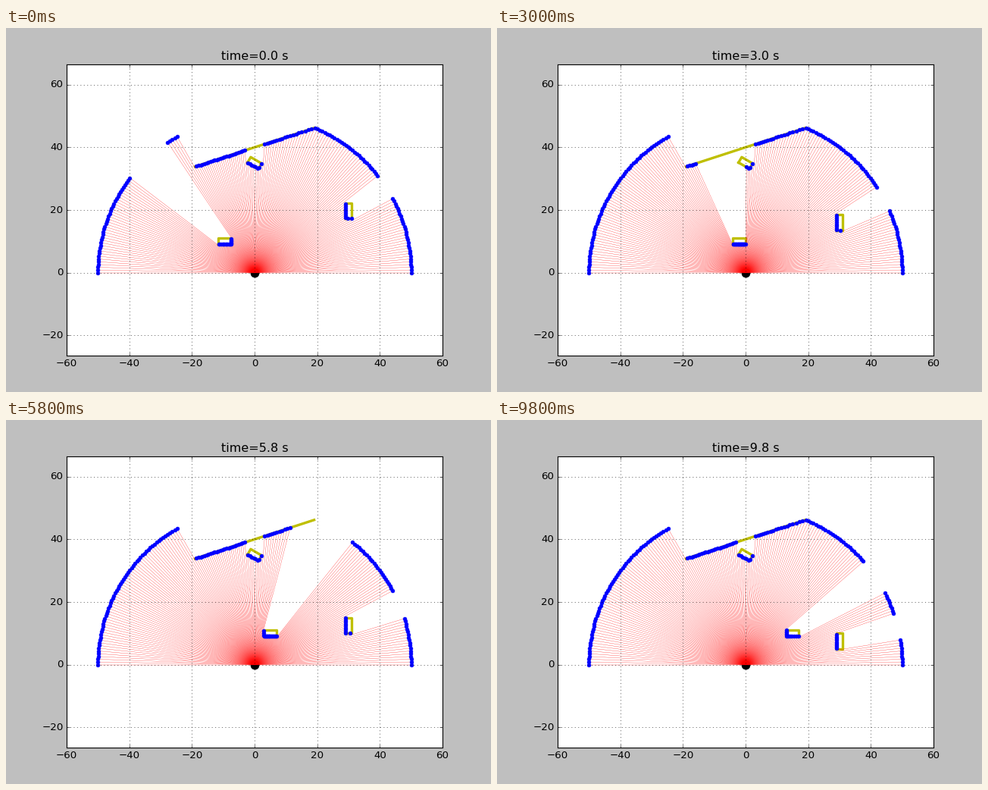
Animation, 640 px wide and 480 px high, one loop 10 s. Source, as a matplotlib script:

```python
import numpy as np
import matplotlib.pyplot as plt
from matplotlib.animation import FuncAnimation
from matplotlib.collections import LineCollection

STEP = 0.2        # seconds per frame
FRAMES = 50
REACH = 50.0      # sensor range
ANGLES = np.linspace(0, np.pi, 180)
RAYS = np.column_stack([np.cos(ANGLES), np.sin(ANGLES)])

plt.style.use("classic")
plt.rcParams.update({
    "font.family": "DejaVu Sans",
    "savefig.dpi": "figure",
    "savefig.facecolor": "auto",
})


def box(cx, cy, w, h, deg=0.0):
    """Closed outline of a rotated rectangle."""
    a = np.radians(deg)
    u = np.array([np.cos(a), np.sin(a)]) * w / 2
    v = np.array([-np.sin(a), np.cos(a)]) * h / 2
    corners = [-u - v, u - v, u + v, -u + v, -u - v]
    return np.array([cx, cy]) + np.array(corners)


def cross(a, b):
    return a[..., 0] * b[..., 1] - a[..., 1] * b[..., 0]


def scan(shapes):
    """First hit along every ray, or the end of its reach."""
    dist = np.full(len(RAYS), REACH)
    for shape in shapes:
        for p, q in zip(shape[:-1], shape[1:]):
            edge = q - p
            det = cross(RAYS, edge)
            ok = np.abs(det) > 1e-12
            safe = np.where(ok, det, 1.0)
            along = cross(p, edge) / safe
            part = cross(p, RAYS) / safe
            hit = ok & (along > 0) & (part >= 0) & (part <= 1)
            dist = np.where(hit, np.minimum(dist, along), dist)
    return RAYS * dist[:, None]


def scene(k):
    n = k + 1
    return [
        box(-10 + 0.5 * n, 10, 4, 2),
        box(30, 20 - 0.25 * n, 2, 5),
        box(0, 35, 4, 2, -30),
        box(0, 40, 40, 0, 18)[:2],
    ]


fig = plt.figure(figsize=(8, 6), dpi=80)
ax = fig.add_axes([0.125, 0.1, 0.775, 0.8])
half = 60 * 384 / 496
ax.set_xlim(-60, 60)
ax.set_ylim(20 - half, 20 + half)
ax.grid(True)

ax.plot(0, 0, "ko", ms=10, zorder=2)
outlines = [ax.plot([], [], color="y", lw=3, zorder=2.1)[0] for _ in range(4)]
beams = LineCollection([], colors="r", linewidths=0.25, zorder=2.2)
ax.add_collection(beams, autolim=False)
hits, = ax.plot([], [], "o", color="b", ms=4.4, mec="b", mew=0.5, zorder=2.3)
title = ax.set_title("")


def draw(k):
    shapes = scene(k)
    for line, shape in zip(outlines, shapes):
        line.set_data(shape[:, 0], shape[:, 1])
    ends = scan(shapes)
    beams.set_segments([[(0, 0), tuple(e)] for e in ends])
    hits.set_data(ends[:, 0], ends[:, 1])
    title.set_text(f"time={k * STEP:.1f} s")
    return [*outlines, beams, hits, title]


anim = FuncAnimation(fig, draw, frames=FRAMES, init_func=lambda: draw(0),
                     interval=1000 * STEP, repeat=True, repeat_delay=0)
plt.show()
```
